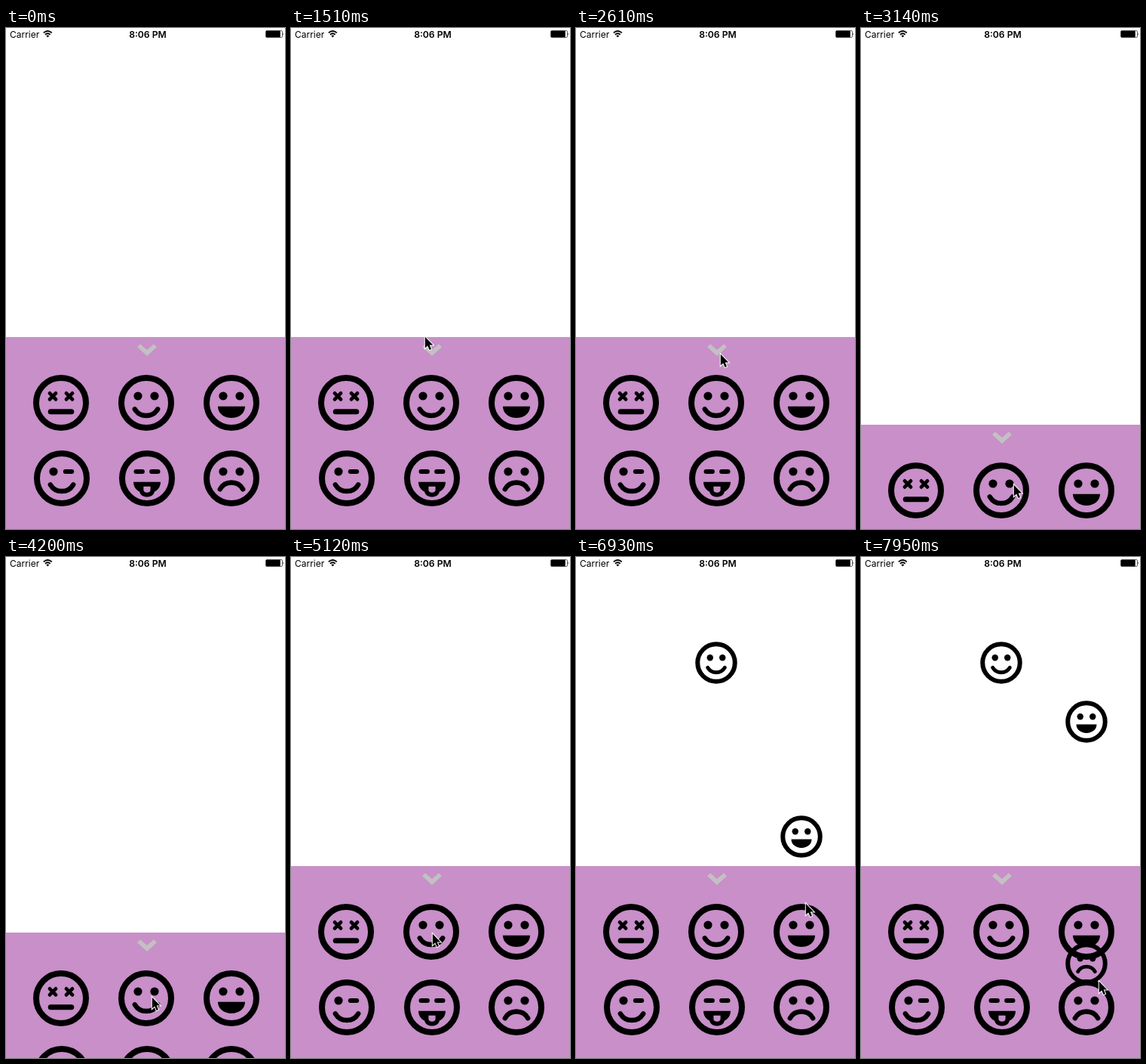
These frames come from a looping animation (370 px wide and 663 px high, 8000 ms). An HTML page:

```html
<!DOCTYPE html>
<html lang="en">
<head>
<meta charset="utf-8">
<title>Smiley tray</title>
<style>
  html, body { margin: 0; width: 100%; height: 100%; overflow: hidden; background: #fff; }
  svg { display: block; width: 370px; height: 663px; }
  text { font-family: Inter, "Liberation Sans", sans-serif; }
  .line { fill: none; stroke: #000; stroke-linecap: round; }
</style>
</head>
<body>
<svg viewBox="0 0 370 663">
  <defs>
    <circle id="ring" r="33" class="line" stroke-width="8"/>
    <circle id="eye" r="5.6" cy="-9"/>
    <path id="dash" d="M-4.2 -9H4.2" class="line" stroke-width="6"/>
    <path id="cross" d="M-4 -12.6L4 -4.6M4 -12.6L-4 -4.6" class="line" stroke-width="4.8"/>
    <path id="curve" d="M-15.2 8.3A17.6 17.6 0 0 0 15.2 8.3" class="line" stroke-width="6.4"/>
    <g id="eyes"><use href="#eye" x="-11"/><use href="#eye" x="11"/></g>

    <g id="dead">
      <use href="#ring"/><use href="#cross" x="-11"/><use href="#cross" x="11"/>
      <path d="M-13.8 11.8H13.8" class="line" stroke-width="7"/>
    </g>
    <g id="smile"><use href="#ring"/><use href="#eyes"/><use href="#curve"/></g>
    <g id="grin">
      <use href="#ring"/><use href="#eyes"/>
      <path d="M-18 4.8H18C18 14 10 20 0 20S-18 14 -18 4.8Z"/>
    </g>
    <g id="wink">
      <use href="#ring"/><use href="#eye" x="-11"/><use href="#dash" x="9"/><use href="#curve"/>
    </g>
    <g id="tongue">
      <use href="#ring"/><use href="#dash" x="-10.3"/><use href="#dash" x="10.3"/>
      <path fill-rule="evenodd" d="M-18 4.8H18C18 11 14.5 15.5 10 17.6C9 22 5 24.6 0 24.6S-9 22 -10 17.6C-14.5 15.5 -18 11 -18 4.8ZM-4.6 10.8V15Q-4.6 18.8 0 18.8T4.6 15V10.8Z"/>
    </g>
    <g id="sad">
      <use href="#ring"/><use href="#eyes"/>
      <use href="#curve" transform="translate(0 22.6) scale(1 -1)"/>
    </g>
  </defs>

  <rect width="370" height="663" fill="#fff"/>

  <text x="5" y="12.5" font-size="12">Carrier</text>
  <text x="188" y="12.5" font-size="12.2" font-weight="600" text-anchor="middle">8:06 PM</text>
  <g fill="none" stroke="#000" stroke-width="1.8">
    <path d="M49.8 6.4Q55.3 1.6 60.8 6.4"/>
    <path d="M51.9 8.7Q55.3 5.8 58.7 8.7"/>
  </g>
  <path d="M53.3 10.3Q55.3 8.7 57.3 10.3L55.3 12.6Z"/>
  <rect x="344.5" y="3.5" width="22" height="9" rx="1.5" fill="none" stroke="#000" stroke-width=".6"/>
  <rect x="344.8" y="3.8" width="19" height="8.4" rx="1"/>
  <path d="M367.3 6.3Q368.8 8 367.3 9.7Z"/>

  <g id="tray">
    <rect width="370" height="256" fill="#c88fc9"/>
    <path d="M174 13.3L178 9.2L187 17L196 9.2L200 13.3L187 25Z" fill="#c3c0c3"/>
    <use href="#dead" x="73" y="87"/>
    <use href="#smile" x="186" y="87"/>
    <use href="#grin" x="299" y="87"/>
    <use href="#wink" x="74" y="187"/>
    <use href="#tongue" x="187" y="187"/>
    <use href="#sad" x="299" y="187"/>
  </g>

  <use id="newSmile" href="#smile"/>
  <use id="newGrin" href="#grin"/>
  <use id="newSad" href="#sad"/>

  <path id="cursor" d="M.8 .8V15.6L4.2 12.4L6.6 18L9 17L6.7 11.5H11.3Z"
        stroke="#fff" stroke-width="2" paint-order="stroke"/>
</svg>

<script>
const LOOP = 8000;
const GAIN = 2.3;          // a dragged face outruns the pointer
const FACE_SCALE = 0.75;

// Time, top edge
const TRAY = [
  [1510, 409], [2060, 284], [2170, 304], [2500, 409], [2930, 409],
  [3140, 525], [3440, 570], [3620, 570], [4900, 409]
];

// Time, x, y below the top edge of the tray
const POINTER = [
  [420, 350, 117], [1220, 178, 22], [1510, 177, -1], [2170, 176, 3],
  [2500, 186, 3], [2930, 204, 78], [4900, 187, 89], [5240, 187, 89],
  [5960, 187, -48], [6250, 187, -66], [6640, 304, 95], [7350, 304, -17],
  [7720, 319, 179], [7950, 315, 152]
];

// A face is dragged from one time to another and dropped at y
const FACES = [
  { id: "newSmile", x: 186, y: 140, from: 5240, to: 6250 },
  { id: "newGrin", x: 299, y: 218, from: 6650, to: 7350 },
  { id: "newSad", x: 299, y: 538, from: 7780, to: 7950 }
];

function along(keys, t) {
  const next = keys.findIndex(k => k[0] > t);
  if (next < 0) return keys.at(-1).slice(1);
  if (next === 0) return keys[0].slice(1);
  const a = keys[next - 1], b = keys[next];
  const p = (t - a[0]) / (b[0] - a[0]);
  return a.slice(1).map((v, i) => v + (b[i + 1] - v) * p);
}

const trayTop = t => along(TRAY, t)[0];

function pointer(t) {
  const [x, dy] = along(POINTER, t);
  return { x, y: trayTop(t) + dy };
}

function put(id, x, y, scale = 1, shown = true) {
  const el = document.getElementById(id);
  el.setAttribute("visibility", shown ? "visible" : "hidden");
  el.setAttribute("transform", `translate(${x} ${y}) scale(${scale})`);
}

function draw(t) {
  put("tray", 0, Math.round(trayTop(t)));
  for (const { id, x, y, from, to } of FACES) {
    const left = pointer(Math.min(t, to)).y - pointer(to).y;
    put(id, x, y + GAIN * left, FACE_SCALE, t >= from);
  }
  const { x, y } = pointer(t);
  put("cursor", Math.round(x), Math.round(y), 1, t >= POINTER[0][0]);
}

const begin = performance.now();
function tick() {
  draw((performance.now() - begin) % LOOP);
  requestAnimationFrame(tick);
}
tick();
</script>
</body>
</html>
```
